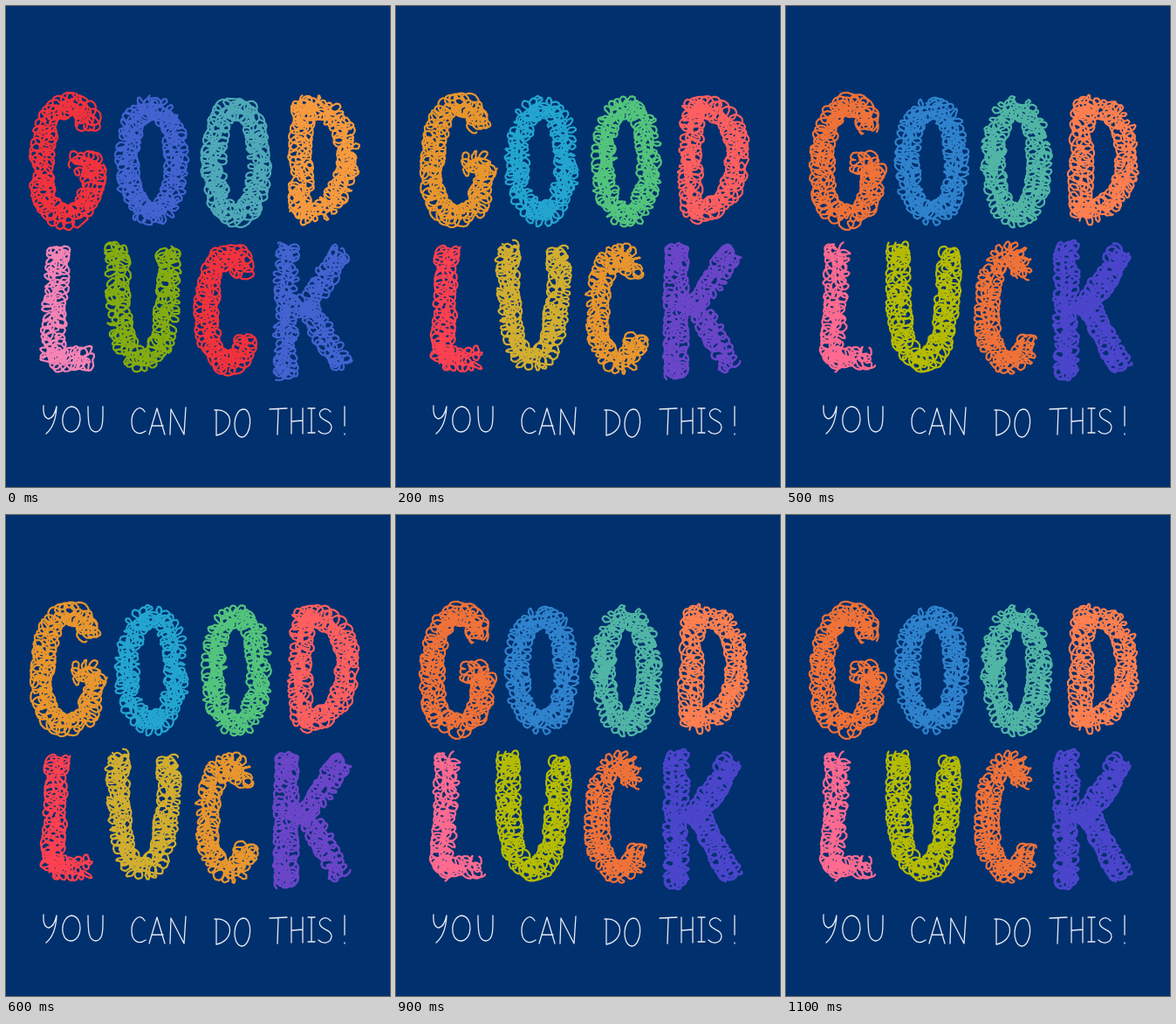
Recreate the animation shown at these times as an HTML page with a canvas. Size 440 by 550 pixels, loop 1.2 s.

```html
<!DOCTYPE html>
<html lang="en">
<head>
<meta charset="utf-8">
<title>Good luck</title>
<style>
html, body { margin: 0; width: 100%; height: 100%; overflow: hidden; background: #01306e; }
canvas { display: block; }
</style>
</head>
<body>
<canvas id="stage" width="440" height="550" role="img" aria-label="GOOD LUCK. You can do this!"></canvas>
<script>
const ctx = document.getElementById('stage').getContext('2d');
const STEP = 100;
const ORDER = [0, 2, 1, 2];   // pose shown in each step
const HALF = 15;              // half the thickness of a letter stroke

const points = text => text.split(' ').map(p => p.split(',').map(Number));

const ring = (cx, cy, rx, ry) => Array.from({ length: 25 }, (_, i) => {
  const a = i / 24 * Math.PI * 2 - Math.PI / 2;
  const bulge = v => Math.sign(v) * Math.abs(v) ** 0.9;
  return [cx + rx * bulge(Math.cos(a)), cy + ry * bulge(Math.sin(a))];
});

// Centre lines of each letter and its colour in each pose
const letters = [
  { colors: ['#f2323c', '#e8962e', '#f07238'],
    lines: [points('94,139 92,121 76,112 58,120 47,140 42,170 42,205 50,230 67,241 86,235 97,213 101,183'),
            points('103,180 77,180')] },
  { colors: ['#4263d0', '#23a5d0', '#2f82cc'], lines: [ring(167, 177, 28, 61)] },
  { colors: ['#4fa9b8', '#53c47c', '#50b5a5'], lines: [ring(264, 178, 26, 62)] },
  { colors: ['#f79a3e', '#ff5f5f', '#ff7f50'],
    lines: [points('341,113 338,175 338,239'),
            points('341,116 365,118 385,138 391,171 384,207 365,230 340,237')] },
  { colors: ['#f583b4', '#ff4050', '#ff6a90'],
    lines: [points('59,278 56,345 53,405'), points('54,404 75,404 96,402')] },
  { colors: ['#84ac10', '#d2ae30', '#b5bb00'],
    lines: [points('128,276 129,335 135,382 156,406 177,385 185,335 186,279')] },
  { colors: ['#f2323c', '#e8962e', '#f07238'],
    lines: [points('269,307 269,292 258,283 244,292 234,316 230,350 235,387 251,408 268,402 277,379')] },
  { colors: ['#4263d0', '#6a45c8', '#4a45cb'], heavy: 0.35,
    lines: [points('322,275 321,345 320,423'), points('383,282 362,317 336,351'),
            points('345,342 364,376 384,412')] }
];

const caption = new Path2D(`M43 457Q42 471 49 472Q55 471 58 458Q57 480 46 489
  M75 458C62 460 61 486 74 487C88 487 89 459 75 458
  M94 458C94 473 94 487 103 487C112 486 111 473 111 458
  M159 464C154 454 144 463 144 475C144 489 153 491 160 486
  M164 490L173 460L182 490M167 480H180
  M188 490L189 461L204 490L206 459
  M241 462V491M239 462C262 460 262 487 241 491
  M272 461C260 462 258 491 270 493C282 492 283 461 272 461
  M302 461L322 460M312 461L311 490
  M327 460V489M340 460V489M327 475L340 474
  M350 460V488M346 460H354M346 488H354
  M372 464C366 457 357 463 360 469C363 475 373 474 373 482C372 490 363 491 358 486
  M388 458V480M388 489V490`);

function seeded(seed) {
  return () => {
    seed = seed + 0x6D2B79F5 | 0;
    let t = Math.imul(seed ^ seed >>> 15, 1 | seed);
    t = t + Math.imul(t ^ t >>> 7, 61 | t) ^ t;
    return ((t ^ t >>> 14) >>> 0) / 4294967296;
  };
}

// Smooth curve through the points, sampled about once per pixel
function trace(pts) {
  const out = [];
  for (let i = 0; i < pts.length - 1; i++) {
    const a = pts[i], b = pts[i + 1];
    const before = pts[i - 1] || a, after = pts[i + 2] || b;
    const n = Math.ceil(Math.hypot(b[0] - a[0], b[1] - a[1]));
    for (let k = 0; k < n; k++) {
      const t = k / n;
      out.push([0, 1].map(d => a[d] + t / 2 * (b[d] - before[d] +
        t * (2 * before[d] - 5 * a[d] + 4 * b[d] - after[d] +
        t * (3 * a[d] - before[d] - 3 * b[d] + after[d])))));
    }
  }
  return out;
}

// Three lanes of irregular looping pen strokes along one centre line
function scribble(path, line, rnd) {
  const track = trace(line), turn = 14;
  const between = (lo, hi) => lo + rnd() * (hi - lo);
  for (const lane of [-8, 0, 8]) {
    const loop = () => {
      const r = between(4.6, 8.6), room = HALF - r;
      const off = Math.max(-room, Math.min(room, lane + between(-4, 4)));
      return [off, r, between(0.45, 0.95), between(-1.6, 1.6), between(3, 10)];
    };
    const spin = rnd() < 0.5 ? -1 : 1;
    let from = loop(), to = loop(), at = 0, pen = 0, angle = rnd() * 6.28;
    while (at < track.length - 1) {
      const u = pen % turn / turn;
      const [off, r, squash, tilt, advance] = from.map((v, i) => v + (to[i] - v) * u);
      const i = Math.floor(at), [x, y] = track[i];
      const p = track[Math.max(0, i - 2)], q = track[Math.min(track.length - 1, i + 2)];
      const len = Math.hypot(q[0] - p[0], q[1] - p[1]) || 1;
      const nx = (p[1] - q[1]) / len, ny = (q[0] - p[0]) / len;
      const ex = r * Math.cos(angle), ey = r * squash * Math.sin(angle);
      const c = Math.cos(tilt), s = Math.sin(tilt);
      path[pen ? 'lineTo' : 'moveTo'](x + nx * off + ex * c - ey * s,
                                      y + ny * off + ex * s + ey * c);
      angle += spin * Math.PI * 2 / turn;
      at += advance / turn;
      if (++pen % turn === 0) { from = to; to = loop(); }
    }
  }
}

const poses = [0, 1, 2].map(pose => letters.map((letter, i) => {
  const path = new Path2D(), rnd = seeded(pose * 97 + i * 13 + 5);
  letter.lines.forEach(line => scribble(path, line, rnd));
  return { path, color: letter.colors[pose], width: 2.2 + pose * (letter.heavy || 0) };
}));

function draw(pose) {
  ctx.fillStyle = '#01306e';
  ctx.fillRect(0, 0, 440, 550);
  ctx.lineCap = ctx.lineJoin = 'round';
  for (const { path, color, width } of poses[pose]) {
    ctx.strokeStyle = color;
    ctx.lineWidth = width;
    ctx.stroke(path);
  }
  ctx.strokeStyle = '#e6ecf4';
  ctx.lineWidth = 1.3;
  ctx.stroke(caption);
}

const start = performance.now();
let shown = -1;
function tick() {
  const pose = ORDER[Math.floor((performance.now() - start) / STEP) % ORDER.length];
  if (pose !== shown) draw(shown = pose);
  requestAnimationFrame(tick);
}
tick();
</script>
</body>
</html>
```
